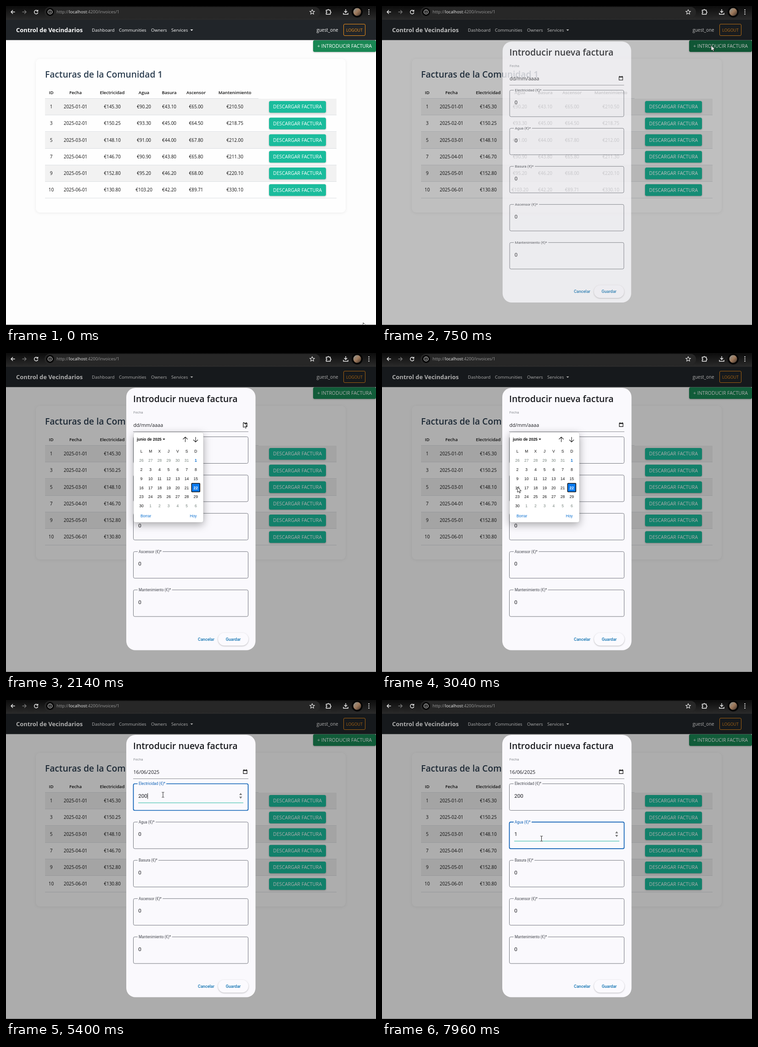
An HTML page that plays this animation: 806 by 695 pixels, repeating every 8000 ms.

```html
<!DOCTYPE html>
<html lang="es">
<head>
<meta charset="utf-8">
<title>Facturas</title>
<style>
html, body { margin: 0; width: 100%; height: 100%; overflow: hidden; background: #fdfdfd; }
svg { display: block; width: 806px; height: 695px; }
text { font-family: "Open Sans", "Noto Sans", sans-serif; white-space: pre; }
.rob { font-family: Roboto, sans-serif; }
.cal { font-family: "Liberation Sans", Arial, sans-serif; }
.icon { fill: none; stroke: #eee; stroke-width: 1.4; }
.lift { filter: drop-shadow(0 1.2px 1.5px #0004); }
.label { paint-order: stroke; stroke: #faf9fd; stroke-width: 6; stroke-linejoin: round; }
</style>
</head>
<body>
<svg id="stage" viewBox="0 0 806 695"></svg>
<script>
const LOOP = 8000;
const stage = document.getElementById('stage');

// Markup helpers; text is placed by the middle of its capitals.
const text = (x, y, s, size, fill = '#111', extra = '') =>
  `<text x="${x}" y="${(y + size * .36).toFixed(2)}" font-size="${size}" fill="${fill}" ${extra}>${s}</text>`;
const rect = (x, y, w, h, fill, extra = '') =>
  `<rect x="${x}" y="${y}" width="${w}" height="${h}" fill="${fill}" ${extra}/>`;
const line = (x1, y, x2, color) => rect(x1, y, x2 - x1, 1, color);
const MID = 'text-anchor="middle"';

function browserBar() {
  return rect(0, 0, 806, 30, 'url(#bar)') +
    rect(84, 2, 600, 23, '#272727', 'rx="11.5"') +
    '<circle cx="96" cy="13" r="9" fill="#0b0b0b"/>' +
    `<g class="icon">
      <path d="M19.5 13H11M15 9l-4 4 4 4"/>
      <path d="M35.5 13H44M40 9l4 4-4 4" stroke="#777"/>
      <path d="M68.5 10.5A4 4 0 1 0 69.5 14M69.5 8.5v3h-3"/>
      <circle cx="96" cy="13" r="4.5" stroke-width="1.2"/><path d="M96 12.5v3M96 10.2v1.2"/>
      <path d="M667 8l1.5 3.3 3.6.4-2.7 2.4.8 3.5-3.2-1.8-3.2 1.8.8-3.5-2.7-2.4 3.6-.4Z" stroke-width="1.1"/>
      <path d="M697.5 9h3.2a1.5 1.5 0 0 1 3 0h2.8v3.2a1.5 1.5 0 0 1 0 3v2.8h-9v-3a1.5 1.5 0 0 0 0-3Z"/>
      <path d="M740 7v7M736.8 11l3.2 3.2 3.2-3.2M735 15v3h10v-3"/>
    </g>` +
    '<circle cx="765" cy="13" r="12" fill="#050505"/><circle cx="765" cy="13" r="8.5" fill="url(#avatar)"/>' +
    [8.5, 13, 17.5].map(y => `<circle cx="790.5" cy="${y}" r="1.2" fill="#eee"/>`).join('') +
    text(110, 13, 'http://<tspan fill="#f2f2f2">localhost</tspan>:4200/invoices/1', 9.3, '#9a9a9a');
}

function navBar() {
  const links = [[187, 'Dashboard'], [246, 'Communities'], [316, 'Owners'], [360, 'Services']];
  return rect(0, 30, 806, 44.3, '#212529') +
    text(22, 52.5, 'Control de Vecindarios', 12.9, '#fff', 'font-weight="700"') +
    links.map(([x, s]) => text(x, 52.5, s, 9.6, '#fff')).join('') +
    '<path d="M401.5 51h6l-3 3.2Z" fill="#fff"/>' +
    text(700, 52.5, 'guest_one', 9.9, '#fff', MID) +
    rect(735.5, 39.5, 47, 25, 'none', 'rx="2.5" stroke="#f0901a"') +
    text(759, 52.5, 'LOGOUT', 8.8, '#f0901a', MID);
}

function invoices() {
  const columns = [98.5, 151.5, 231.5, 300.5, 355.5, 414, 498.5];
  const heads = ['ID', 'Fecha', 'Electricidad', 'Agua', 'Basura', 'Ascensor', 'Mantenimiento'];
  const rows = [
    '1 01 145.30 90.20 43.10 65.00 210.50', '3 02 150.25 93.30 45.00 64.50 218.75',
    '5 03 148.10 91.00 44.00 67.80 212.00', '7 04 146.70 90.90 43.80 65.80 211.30',
    '9 05 152.80 95.20 46.20 68.00 220.10', '10 06 130.80 103.20 42.20 89.71 330.10'];
  const body = rows.map((row, i) => {
    const y = 202 + i * 36.25;
    const cells = row.split(' ').map((v, c) => c === 0 ? v : c === 1 ? `2025-${v}-01` : '€' + v);
    return (i % 2 ? '' : rect(85, y, 635, 36, '#f2f2f2')) +
      line(85, Math.round(y + 35.2), 720, '#dcdfe2') +
      cells.map((s, c) => text(columns[c], y + 17.5, s, 9.9, '#111', MID)).join('') +
      rect(573, y + 5, 124, 25.5, '#1abc9c', 'rx="3.5" class="lift"') +
      text(635, y + 17.7, 'DESCARGAR FACTURA', 10.4, '#fff', MID);
  });
  return rect(65, 115, 675, 335, '#fefefe', 'rx="9" style="filter:drop-shadow(0 1px 3px #00000012)"') +
    text(85, 149.2, 'Facturas de la Comunidad 1', 19.2, '#2c3e50', 'font-weight="600"') +
    heads.map((s, c) => text(columns[c], 188.5, s, 9.6, '#111', MID + ' font-weight="600"')).join('') +
    line(85, 201, 550, '#dcdfe2') + body.join('') +
    rect(669, 74.5, 137, 25.5, '#198754', 'rx="3.5" class="lift" id="add"') +
    text(678, 87.2, '+ INTRODUCIR FACTURA', 10.5, '#fff');
}

const fieldNames = ['Electricidad', 'Agua', 'Basura', 'Ascensor', 'Mantenimiento'];
const fieldTop = i => 182.5 + i * 83.4;

function field(name, i) {
  const y = fieldTop(i);
  return `<g id="field${i}">` +
    rect(277.5, y, 250, 58, 'none', 'rx="3" class="box"') +
    text(289, y, name + ' (€)*', 8.15, '#44474e', 'class="rob label"') +
    text(288.3, y + 26.3, '0', 11.6, '#1a1b1f', 'class="rob value"') +
    `<g class="active">${line(288, y + 41, 517, '#26b8a0')}</g>
    <path class="spin" d="M508 ${y + 24.5}l3.2-4.5 3.2 4.5ZM508 ${y + 28}l3.2 4.5 3.2-4.5Z" fill="#777"/>` +
    rect(288, y + 20.5, 1, 12.5, '#222', 'class="caret"') + '</g>';
}

function dialog() {
  return '<g id="dialog">' +
    rect(262, 76, 281.5, 571.5, '#faf9fd', 'rx="20"') +
    text(277, 100, 'Introducir nueva factura', 19.4, '#1a1b1f', 'font-weight="600"') +
    text(277.5, 129.5, 'Fecha', 7.8, '#8b8f94', 'class="rob"') +
    text(277.5, 157, '', 10.7, '#1a1b1f', 'id="date"') +
    `<path d="M517 152.8h8v7.5h-8ZM517 154h8" fill="none" stroke="#111" stroke-width="1.2"/>
    <path d="M518.5 151v2M523.5 151v2" stroke="#111"/>` +
    line(277, 171, 528, '#8c8e93') +
    fieldNames.map(field).join('') +
    text(436, 623.5, 'Cancelar', 9.1, '#0b70b0', MID + ' class="rob" font-weight="500"') +
    rect(462, 609.5, 66, 28, '#fbfafe', 'rx="14" class="lift"') +
    text(495, 623.5, 'Guardar', 9.1, '#0b70b0', MID + ' class="rob" font-weight="500"') + '</g>';
}

function calendar() {
  const colX = c => 295 + c * 19.72;
  let days = '';
  for (let i = 0; i < 42; i++) {
    const n = i - 5, c = i % 7, y = 234 + Math.floor(i / 7) * 19.8;
    const inMonth = n >= 1 && n <= 30;
    const label = n < 1 ? n + 31 : n > 30 ? n - 30 : n;
    const color = n === 22 ? '#fff' : n === 1 ? '#0a6fd0' : inMonth ? '#111' : '#78857f';
    if (n === 22) days += rect(colX(c) - 9, y - 9.5, 18, 18.5, '#0b7bf0', 'rx="1" stroke="#111" stroke-width="1.5"');
    days += text(colX(c), y, label, 8.6, color, MID + ` class="cal" font-weight="${n === 22 || n === 1 ? 700 : 400}"`);
  }
  return '<g id="calendar">' +
    rect(278, 173, 152, 196, '#fff', 'rx="4" style="filter:drop-shadow(0 5px 9px #0005)" stroke="#0003" stroke-width=".6"') +
    text(285, 188, 'junio de 2025', 8.5, '#111', 'class="cal" font-weight="700"') +
    `<path d="M341.5 186.5h5l-2.5 3.2Z" fill="#111"/>
    <path d="M390.5 194v-11M385.5 188l5-5 5 5M413 183v11M408 189l5 5 5-5" fill="none" stroke="#222" stroke-width="1.1"/>` +
    [...'LMXJVSD'].map((s, c) => text(colX(c), 214, s, 8.5, '#111', MID + ' class="cal"')).join('') + days +
    text(293, 354.5, 'Borrar', 8.4, '#0a6fd0', 'class="cal"') +
    text(415.5, 354.5, 'Hoy', 8.4, '#0a6fd0', 'text-anchor="end" class="cal"') + '</g>';
}

stage.innerHTML = `<defs>
  <linearGradient id="bar" x2="0" y2="1"><stop stop-color="#0c0c0c"/><stop offset="1" stop-color="#2b2b2b"/></linearGradient>
  <linearGradient id="avatar" x2="1" y2="1"><stop stop-color="#8f9a98"/><stop offset=".5" stop-color="#a07a5c"/><stop offset="1" stop-color="#3b2f28"/></linearGradient>
  </defs>` + rect(0, 0, 806, 695, '#fdfdfd') + invoices() + navBar() + browserBar() +
  rect(0, 30, 806, 665, '#000', 'id="shade"') + dialog() + calendar() +
  line(0, 694, 806, '#777') +
  `<path id="arrow" d="M0 0V11.5L2.7 9 4.5 13 6.4 12.2 4.7 8.3H8.2Z" fill="#fff" stroke="#111" stroke-width=".9"/>
  <path id="beam" d="M-2.5-5.5h2l.5.5.5-.5h2M0-5V5M-2.5 5.5h2l.5-.5.5.5h2" fill="none" stroke="#222"/>`;

const $ = id => document.getElementById(id);
const show = (el, on) => el.setAttribute('visibility', on ? 'visible' : 'hidden');
const stepAt = (list, t) => list.reduce((last, s) => t >= s[0] ? s : last);

const pointer = [
  [0, 778, 690], [70, 775, 670], [280, 738, 250], [550, 717, 86], [890, 717, 86],
  [1250, 625, 125], [1660, 517, 151], [2280, 517, 151], [2650, 410, 225], [3040, 295, 292],
  [3500, 295, 292], [3750, 395, 298], [3990, 420.5, 270.5], [4210, 342, 206.5],
  [5800, 342, 206.5], [6280, 347.5, 302]];

function pointerAt(t) {
  const i = pointer.findIndex(p => p[0] > t);
  if (i < 0) return pointer.at(-1).slice(1);
  const [a, b] = [pointer[i - 1], pointer[i]];
  const k = (t - a[0]) / (b[0] - a[0]), e = k * k * (3 - 2 * k);
  return [a[1] + (b[1] - a[1]) * e, a[2] + (b[2] - a[2]) * e];
}

// time, scale, dialog opacity, shade opacity
const opening = [[0, 1, 0, 0], [690, .934, .3, .12], [750, .995, .78, .25], [820, 1, 1, .32]];
// time, text, caret
const typing = [
  [[0, '0', 0], [4340, '0', 1], [4810, '', 1], [5070, '2', 1], [5270, '20', 1], [5400, '200', 1], [5870, '200', 0]],
  [[0, '0', 0], [6360, '0', 1], [6900, '', 1], [7430, '1', 1], [7960, '1', 0]]];

function draw(t) {
  const [, scale, opacity, shade] = stepAt(opening, t);
  $('dialog').setAttribute('opacity', opacity);
  $('dialog').setAttribute('transform', `translate(402.75 361.75) scale(${scale}) translate(-402.75 -361.75)`);
  $('shade').setAttribute('opacity', shade);
  show($('calendar'), t >= 1800 && t < 3440);
  $('date').textContent = t < 3440 ? 'dd/mm/aaaa' : '16/06/2025';

  const [x, y] = pointerAt(t);
  const overAdd = x > 669 && y > 75 && y < 100 && opacity < 1;
  $('add').setAttribute('fill', overAdd ? '#157347' : '#198754');

  const focus = t < 4340 ? -1 : t < 6360 ? 0 : 1;
  let overInput = false;
  fieldNames.forEach((_, i) => {
    const part = name => $('field' + i).querySelector('.' + name);
    const top = fieldTop(i), active = focus === i;
    const inside = t >= 3440 && x > 277 && x < 528 && y > top && y < top + 58;
    const onText = inside && x > 288 && x < 517 && y > top + 15 && y < top + 43;
    const [, value, caret] = typing[i] ? stepAt(typing[i], t) : [0, '0', 0];
    overInput ||= onText;
    part('box').setAttribute('stroke', active ? '#0b5fb5' : inside ? '#1a1b1f' : '#74777f');
    part('box').setAttribute('stroke-width', active ? 1.7 : 1);
    part('label').setAttribute('fill', active ? '#0b5fb5' : '#44474e');
    part('value').textContent = value;
    part('caret').setAttribute('x', 288 + value.length * 6.7);
    show(part('caret'), caret);
    show(part('active'), active);
    show(part('spin'), active || onText);
  });
  for (const id of ['arrow', 'beam']) {
    $(id).setAttribute('transform', `translate(${x.toFixed(1)} ${y.toFixed(1)})`);
    show($(id), (id === 'beam') === overInput);
  }
}

const start = performance.now();
function tick() {
  draw((performance.now() - start) % LOOP);
  requestAnimationFrame(tick);
}
tick();
</script>
</body>
</html>
```
